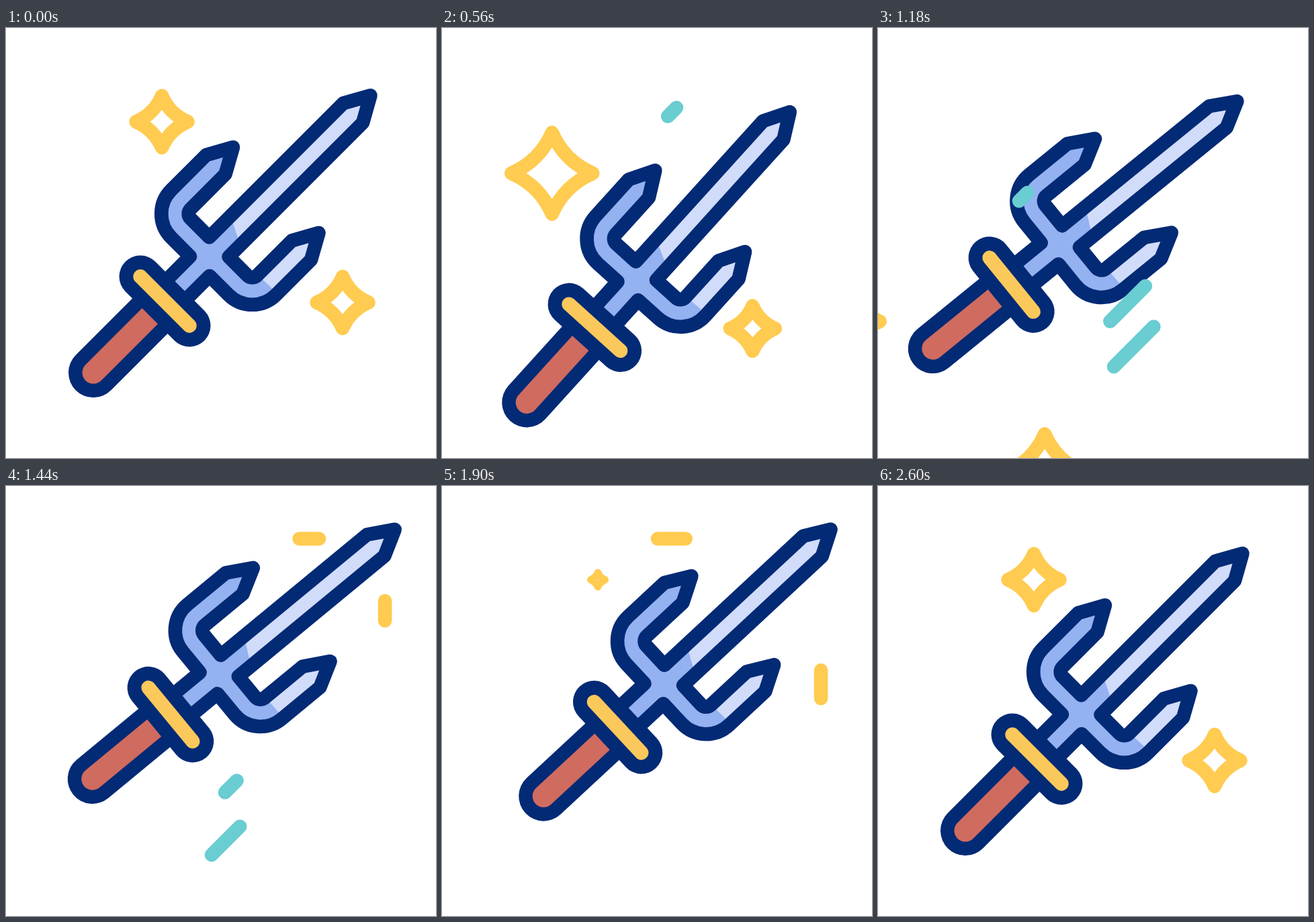
Animation of 640 by 640 pixels, one loop 3000 ms. Source, as an HTML page with a canvas:

```html
<!DOCTYPE html>
<html lang="en">
<head>
<meta charset="utf-8">
<title>Sai</title>
<style>
  html, body { margin: 0; width: 100%; height: 100%; overflow: hidden; background: #fff; }
  canvas { display: block; width: 640px; height: 640px; }
</style>
</head>
<body>
<canvas width="640" height="640"></canvas>
<script>
const ctx = document.querySelector('canvas').getContext('2d');
const LOOP = 3000, LINE = 20.6;
const NAVY = '#032a75', BLUE = '#94b1f1', PALE = '#d1dcfa', GOLD = '#fbc85b',
      YELLOW = '#ffcb50', RED = '#d06b60', TEAL = '#69cdd2';

const ease = (t, from, to) => {
  const u = Math.min(1, Math.max(0, (t - from) / (to - from)));
  return u * u * (3 - 2 * u);
};

// Eased value through [time, value] keys.
function tween(t, keys) {
  let value = keys[0][1];
  for (let i = 1; i < keys.length; i++) {
    value += (keys[i][1] - keys[i - 1][1]) * ease(t, keys[i - 1][0], keys[i][0]);
  }
  return value;
}

// Left half of the blade as [x, y, corner radius], mirrored across x + y = 643.
const half = [
  [502, 112], [302.5, 311.5], [267.5, 276.5, 10], [326.5, 217.5], [338, 177.5],
  [298, 189], [210.5, 276.5, 50], [274, 340], [230, 384]
];
const mirrored = half.map(([x, y, r]) => [643 - y, 643 - x, r]).reverse();
const outline = [[542.5, 100.5], ...half, ...mirrored];
const blade = new Path2D();
outline.forEach(([x, y, r], i) => {
  const next = outline[(i + 1) % outline.length];
  if (!i) blade.moveTo(x, y);
  else if (r) blade.arcTo(x, y, next[0], next[1], r);
  else blade.lineTo(x, y);
});
blade.closePath();
const shine = new Path2D('M334 279L349 324L376 369L402 393L660 300L560 60Z');

function line(x1, y1, x2, y2, color, width = LINE) {
  ctx.strokeStyle = color;
  ctx.lineWidth = width;
  ctx.beginPath();
  ctx.moveTo(x1, y1);
  ctx.lineTo(x2, y2);
  ctx.stroke();
}

const slideKeys = [[100, 0], [1080, -54], [1280, 36], [1980, 36], [2600, 0]];
const tiltKeys = [[40, 0], [1060, 5.5], [1300, -17], [1620, 11], [1778, -6.2], [1980, 0]];

function drawSword(t) {
  const slide = tween(t, slideKeys);
  ctx.save();
  ctx.translate(540 + slide, 103 - slide);
  ctx.rotate(-tween(t, tiltKeys) * Math.PI / 180);
  ctx.translate(-540, -103);

  ctx.fillStyle = BLUE;
  ctx.fill(blade);
  ctx.save();
  ctx.clip(blade);
  ctx.fillStyle = PALE;
  ctx.fill(shine);
  ctx.restore();
  ctx.strokeStyle = NAVY;
  ctx.lineWidth = LINE;
  ctx.stroke(blade);

  line(130, 513, 215, 428, NAVY, 74);
  line(130, 513, 215, 428, RED, 33);
  line(200, 370, 273, 443, NAVY, 63);
  line(200, 370, 273, 443, GOLD, 21.4);
  ctx.restore();
}

function drawStar(x, y, size) {
  if (size < 1) return;
  const c = size * 0.3;
  ctx.strokeStyle = YELLOW;
  ctx.lineWidth = Math.min(LINE, size);
  ctx.beginPath();
  ctx.moveTo(x, y - size);
  ctx.quadraticCurveTo(x + c, y - c, x + size, y);
  ctx.quadraticCurveTo(x + c, y + c, x, y + size);
  ctx.quadraticCurveTo(x - c, y + c, x - size, y);
  ctx.quadraticCurveTo(x - c, y - c, x, y - size);
  ctx.closePath();
  ctx.stroke();
}

const sizeA = [[40, 38.5], [560, 60.5], [900, 37], [1180, 35], [1600, 0], [1800, 0], [2150, 53], [2600, 38.5]];
const sizeB = [[40, 38.5], [500, 33], [1180, 57], [1650, 0], [1900, 0], [2260, 52], [2600, 38.5]];

function drawStars(t) {
  const away = t < 1700;
  const a = away ? 346 * ease(t, 150, 1500) : 0;
  const b = away ? 332 * ease(t, 280, 1600) : 0;
  drawStar(232 - 0.89 * a, 139.5 + a, tween(t, sizeA));
  drawStar(501 - b, 408.5 + b, tween(t, sizeB));
}

// A stroke whose head runs from one end to the other and whose tail follows.
function streak(t, start, x, y, dx, dy, color) {
  const head = ease(t, start, start + 590);
  const tail = ease(t, start + 250, start + 840);
  if (head > 0 && tail < 1) {
    line(x + dx * tail, y + dy * tail, x + dx * head, y + dy * head, color);
  }
}

function draw(now) {
  const t = now % LOOP;
  ctx.clearRect(0, 0, 640, 640);
  ctx.lineCap = ctx.lineJoin = 'round';
  drawStars(t);
  drawSword(t);
  streak(t, 450, 349, 118.5, -139, 139, TEAL);
  streak(t, 770, 414, 368, -88, 88, TEAL);
  streak(t, 850, 416, 439, -110, 110, TEAL);
  streak(t, 1270, 466, 78.5, -145, 0, YELLOW);
  streak(t, 1270, 564, 171, 0, 145, YELLOW);
}

const begin = performance.now();
function frame() {
  draw(performance.now() - begin);
  requestAnimationFrame(frame);
}
frame();
</script>
</body>
</html>
```
